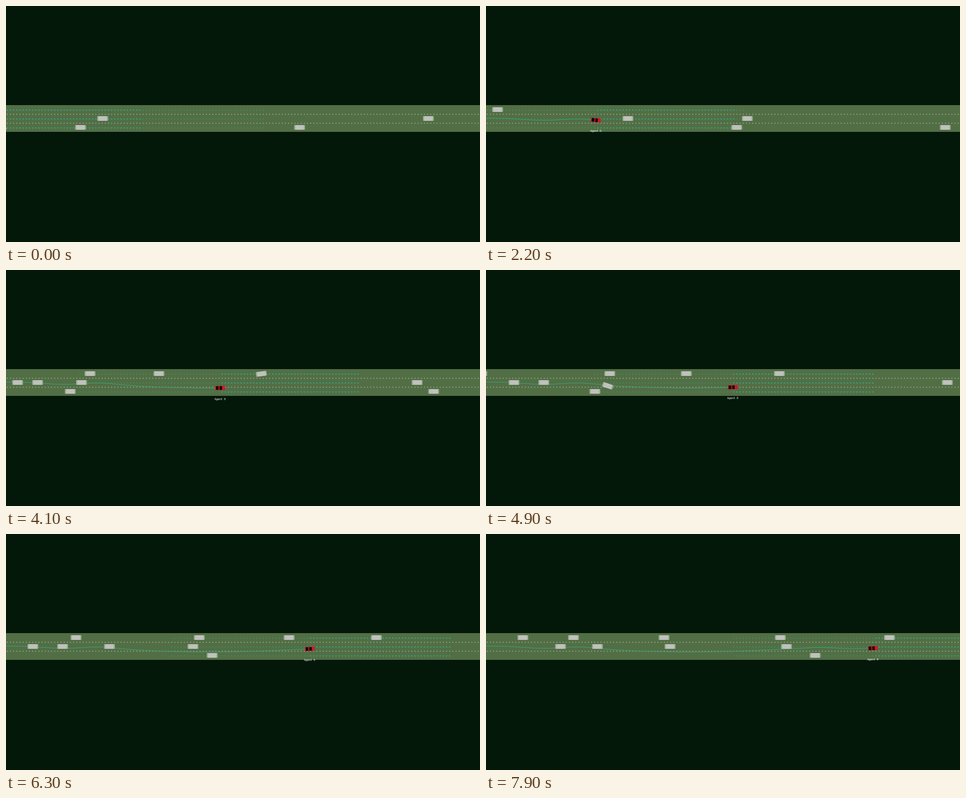
A matplotlib script for the animation above (8 s loop, 900x450 px).

```python
import numpy as np
import matplotlib.pyplot as plt
from matplotlib.animation import FuncAnimation
from matplotlib.collections import PolyCollection
from matplotlib.patches import Rectangle

W, H, DPI = 900, 450, 100
FRAMES, STEP = 80, 100
PX = 72 / DPI

BACK, ROAD, MARK = "#031809", "#526e45", "#a3b095"
DIM, BRIGHT, TRAIL = "#3c9268", "#339f80", "#3b9f78"

PITCH = 6
TOP, MID, BOT = LANES = 197.5, 214.5, 231.5
REACH = 267
CHANGE = 0.7  # seconds a lane change takes


def flow(t):
    """Time warped by the wave of fast and slow traffic all cars share."""
    w = 2 * np.pi / 5.6
    return t + 0.18 / w * np.sin(w * (t - 2.3))


def smooth(u):
    u = np.clip(u, 0, 1)
    return u * u * (3 - 2 * u)


class Car:
    """Passes (time, x) points at the pace of the traffic flow."""

    def __init__(self, lane, *points, moves=()):
        self.lane, self.moves = lane, moves
        t, self.xs = np.array(points, float).T
        self.ss = flow(t)

    def x(self, t):
        s = flow(t)
        i = np.clip(np.searchsorted(self.ss, s) - 1, 0, len(self.ss) - 2)
        u = (s - self.ss[i]) / (self.ss[i + 1] - self.ss[i])
        return self.xs[i] + u * (self.xs[i + 1] - self.xs[i])

    def y(self, t):
        y = self.lane
        for start, lane in self.moves:
            y += (lane - y) * smooth((t - start) / CHANGE)
        return y

    def pose(self, t, e=0.02):
        dx, dy = self.x(t + e) - self.x(t - e), self.y(t + e) - self.y(t - e)
        return self.x(t), self.y(t), np.arctan2(dy, dx)


CARS = [
    Car(TOP, (0, -14), (2.2, 269.5), (4.9, 557), (7.9, 916),
        moves=[(1.45, MID), (3.47, TOP)]),
    Car(TOP, (2.2, 22), (6.3, 537.5)),
    Car(TOP, (3.0, 36), (6.3, 367)),
    Car(TOP, (4.9, -8), (7.9, 338)),
    Car(TOP, (6.3, -12), (7.9, 166)),
    Car(TOP, (7.2, 22), (7.9, 70)),
    Car(MID, (0, 802), (0.9, 920)),
    Car(MID, (0, 183.5), (4.9, 876)),
    Car(MID, (3.0, 0), (4.9, 231), (7.9, 625), moves=[(4.61, BOT)]),
    Car(MID, (4.1, 60), (6.3, 196.5), (7.9, 349.5)),
    Car(MID, (4.1, 22), (6.3, 107.5), (7.9, 211.5)),
    Car(MID, (6.3, 51), (7.9, 141.5)),
    Car(BOT, (0, 557.5), (2.2, 872)),
    Car(BOT, (0, 141.5), (2.2, 476), (4.1, 812)),
    Car(BOT, (4.1, 122), (6.3, 355), moves=[(5.3, MID)]),
]


class Agent(Car):
    """The red car, which wanders along a free path."""

    way = np.array([(-60, 214), (30, 214), (110, 218), (185, 215.6), (225, 219.3),
                    (350, 224.8), (575, 219.2), (635, 216.3), (690, 218.7), (760, 217)])

    def path(self, x):
        xs, ys = self.way.T
        m = np.gradient(ys, xs)
        i = np.clip(np.searchsorted(xs, x) - 1, 0, len(xs) - 2)
        h = xs[i + 1] - xs[i]
        u = (x - xs[i]) / h
        bend = u * (1 - u) * h * ((1 - u) * m[i] - u * m[i + 1])
        return ys[i] + smooth(u) * (ys[i + 1] - ys[i]) + bend

    def y(self, t):
        return self.path(self.x(t))


agent = Agent(MID, (0, -9), (4.1, 406.5), (7.9, 734.5))

# Car parts as (left, right, half height, colour), relative to the centre.
TRAFFIC_PARTS = [(-10.2, 10.2, 4.4, "#9bb08f"), (-8, 8, 4.4, "#bfc1bd")]
AGENT_PARTS = [
    (-9.3, 9.3, 3.9, "#d3172a"),
    (-8.0, 4.0, 3.4, "#9c1420"),
    (-7.6, -3.4, 3.3, "#080506"),
    (-0.6, 3.5, 3.3, "#080506"),
]


def place(parts, x, y, a):
    c, s = np.cos(a), np.sin(a)
    turn = np.array([[c, s], [-s, c]])
    return [np.array([(l, -h), (r, -h), (r, h), (l, h)]) @ turn + (x, y)
            for l, r, h, _ in parts]


def dots(color, size, shape="o"):
    return ax.plot([], [], shape, color=color, ms=size * PX, mew=0)[0]


def rows(lo, hi, ys):
    """Evenly spaced points between lo and hi on each line."""
    xs = np.arange(2, W, PITCH)
    xs = xs[(xs >= lo) & (xs <= hi)]
    return np.tile(xs, len(ys)), np.repeat(ys, len(xs))


fig = plt.figure(figsize=(W / DPI, H / DPI), dpi=DPI, facecolor=BACK)
ax = fig.add_axes([0, 0, 1, 1])
ax.set(xlim=(0, W), ylim=(H, 0))
ax.axis("off")

ax.add_patch(Rectangle((-5, 189), W + 10, 51, color=ROAD, lw=0))
dots(MARK, 1.7, "s").set_data(*rows(0, W, (206, 223)))
dim = dots(DIM, 2.1)
bright = dots(BRIGHT, 2.8)
trail, = ax.plot([], [], color=TRAIL, lw=1.1 * PX)

parts = TRAFFIC_PARTS * len(CARS) + AGENT_PARTS
bodies = PolyCollection([], facecolors=[p[3] for p in parts], linewidths=0,
                        snap=False, zorder=3)
ax.add_collection(bodies, autolim=False)
label = ax.text(0, 0, "Agent 0", color="white", size=5 * PX,
                family="DejaVu Sans Mono", ha="center", va="center")


def draw(i):
    t = i * STEP / 1000
    x, y, a = agent.pose(t)
    dim.set_data(*rows(x - REACH, max(x + REACH, 490), LANES))
    bright.set_data(*rows(x, x + REACH, LANES))
    xs = np.append(np.arange(-60, x, 3), x)
    trail.set_data(xs, agent.path(xs))
    polys = [p for car in CARS for p in place(TRAFFIC_PARTS, *car.pose(t))]
    bodies.set_verts(polys + place(AGENT_PARTS, x, y, a))
    label.set_position((x, y + 21.3))
    return dim, bright, trail, bodies, label


anim = FuncAnimation(fig, draw, frames=FRAMES, interval=STEP, repeat=True,
                     repeat_delay=0, blit=False)
plt.show()
```
